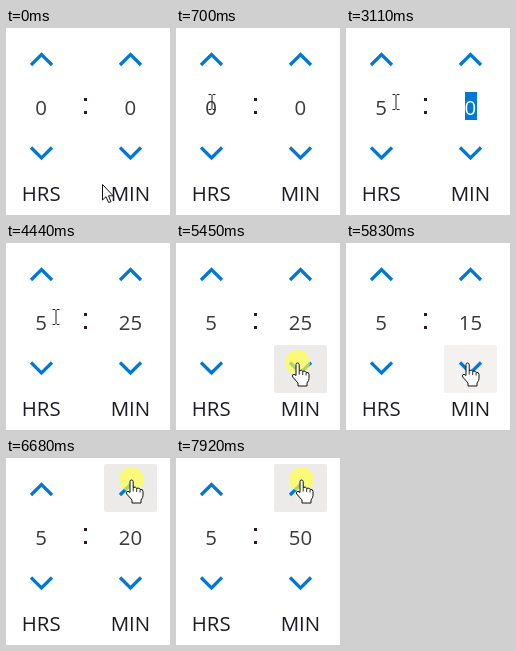
An HTML page for the animation above (8000 ms loop, 164 by 187 pixels).

```html
<!DOCTYPE html>
<html lang="en">
<head>
<meta charset="utf-8">
<title>Time picker</title>
<style>
  html, body { margin: 0; width: 100%; height: 100%; overflow: hidden; background: #fff; }
  svg { display: block; }
  text { font: 20.4px "Open Sans", "Noto Sans", sans-serif; text-anchor: middle; fill: #1c1a26; }
  .value { fill: #3a393c; }
  .chevron { fill: none; stroke: #0078d4; stroke-width: 3.3; }
  .ring { fill: none; stroke: #605e5c; }
  .ink { stroke: #111; fill: #fff; stroke-linejoin: round; }
  #click { fill: #ffff46; opacity: .68; }
</style>
</head>
<body>
<svg width="164" height="187" viewBox="0 0 164 187">
  <rect width="164" height="187" fill="#fff"/>
  <rect id="hover" x="98" width="53" height="48" rx="2"/>
  <path class="chevron" d="M25 37L35.5 26.5 46 37M25 119.5L35.5 130 46 119.5"/>
  <path class="chevron" d="M114 37L124.5 26.5 135 37M114 119.5L124.5 130 135 119.5"/>
  <rect id="ring" class="ring" width="48" height="45"/>
  <rect id="selection" x="119" y="64" width="12" height="28" fill="#0078d7"/>
  <text id="hours" class="value" x="35" y="87"></text>
  <text id="minutes" class="value" x="124.4" y="87"></text>
  <path d="M78 70h3v3h-3zM78 83h3v3h-3z" fill="#2b1a24"/>
  <text x="35.2" y="173">HRS</text>
  <text x="124.4" y="173">MIN</text>
  <rect id="caret" y="64" width="1" height="28" fill="#111"/>
  <circle id="click" r="12.5"/>
  <g id="cursor">
    <path id="arrow" class="ink" d="M.5 .5V16L4 12.7 6.6 18.6 9 17.6 6.5 11.8H11.2Z"/>
    <path id="beam" fill="none" stroke="#222" d="M-3.5-7.5H-1L0-6.5 1-7.5H3.5M0-6.5V6.5M-3.5 7.5H-1L0 6.5 1 7.5H3.5"/>
    <g id="hand">
      <path class="ink" d="M-1.5 13V2Q-1.5 .5 0 .5T1.7 2V8Q4.5 7 5.2 8.8 8 8 8.6 9.8 11.5 9.5 11.5 12V16Q11.5 18 9.5 20.5V23.5H.5V20.5L-4.8 14.5Q-6 12-3.5 11.8Z"/>
      <path fill="none" stroke="#111" stroke-width=".9" d="M1.7 8V12M5.2 9V12.5M8.6 10V13"/>
    </g>
  </g>
</svg>
<script>
const LOOP = 8000;
const RIGHT = 124.5;
const $ = id => document.getElementById(id);

// Pointer glides: start, duration, destination.
const glides = [
  [70, 1, 81, 136], [240, 80, 104, 168], [320, 380, 36, 74], [860, 220, 50, 74],
  [4940, 210, 135, 116], [5150, 150, 121.5, 119.5],
  [6030, 260, 126, 34.5], [6290, 80, 125.5, 21.5]
];

const clamp = (v, lo, hi) => Math.min(hi, Math.max(lo, v));
const within = (v, lo, hi) => v >= lo && v < hi;

// How many of n evenly spaced steps have happened.
const steps = (t, start, period, n) => clamp(Math.floor((t - start) / period) + 1, 0, n);
const pulse = (t, start, period, n, width) =>
  within(t, start, start + period * n) && (t - start) % period < width;

function pointerAt(t) {
  let x = 96, y = 156;
  for (const [start, length, toX, toY] of glides) {
    const p = clamp((t - start) / length, 0, 1);
    const ease = p * p * (3 - 2 * p);
    x += (toX - x) * ease;
    y += (toY - y) * ease;
  }
  return [x, y];
}

function pointerKind(x, y) {
  if (within(x, 98, 151) && (within(y, 6, 54) || within(y, 102, 150))) return 'hand';
  const overValue = within(y, 58, 98) && (x < 61 || x > 99);
  return overValue ? 'beam' : 'arrow';
}

function minutesAt(t) {
  if (t < 3820) return 0;
  if (t < 3890) return 2;
  const downs = steps(t, 5530, 225, 3);
  const ups = steps(t, 6450, 153, 4) + steps(t, 7140, 250, 4);
  return 25 + 5 * (ups - downs);
}

const isPressed = t =>
  within(t, 780, 860) || pulse(t, 5450, 225, 3, 150) ||
  pulse(t, 6370, 153, 4, 80) || t >= 7060;

const show = (id, on) => $(id).setAttribute('visibility', on ? 'visible' : 'hidden');
const set = (id, attrs) => {
  for (const key in attrs) $(id).setAttribute(key, attrs[key]);
};

function draw(t) {
  const [x, y] = pointerAt(t);
  const kind = pointerKind(x, y);
  const pressed = isPressed(t);
  const minutes = String(minutesAt(t));
  const selected = within(t, 3110, 3820);

  $('hours').textContent = t < 2180 ? 0 : 5;
  $('minutes').textContent = minutes;
  $('minutes').style.fill = selected ? '#fff' : '';
  show('selection', selected);

  for (const id of ['arrow', 'beam', 'hand']) show(id, id === kind);
  set('cursor', { transform: `translate(${x} ${y})` });
  set('click', { cx: x, cy: y });
  show('click', pressed);
  set('hover', { y: y < 60 ? 6 : 102, fill: pressed ? '#edebe9' : '#f3f2f1' });
  show('hover', kind === 'hand');

  const inHours = within(t, 860, 2580);
  const inMinutes = within(t, 3820, 5450);
  const blinkOn = (t - (inHours ? 860 : 3820)) % 1000 < 620;
  set('caret', { x: inHours ? 40 : Math.round(RIGHT + 5.5 * minutes.length - .5) });
  show('caret', (inHours || inMinutes) && blinkOn);

  // Focus tabs from the left down button to the right up button.
  set('ring', t < 2880 ? { x: 11.5, y: 102.5 } : { x: 100.5, y: 8.5 });
  show('ring', within(t, 2580, 3110));
}

let start;
function tick(now) {
  start ??= now;
  draw((now - start) % LOOP);
  requestAnimationFrame(tick);
}
draw(0);
requestAnimationFrame(tick);
</script>
</body>
</html>
```
